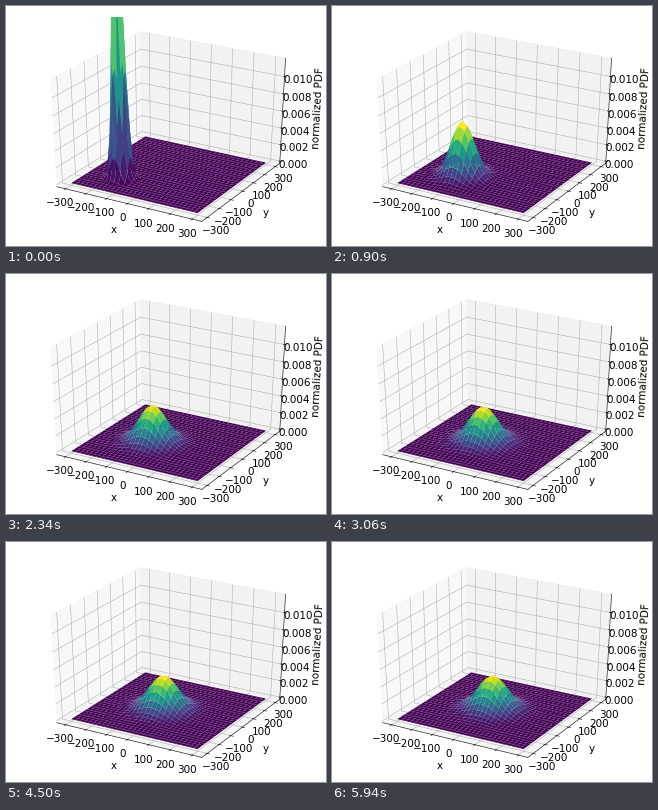
A matplotlib script that plays this animation: 320x240 px, repeating every 6.12 s.

```python
import numpy as np
import matplotlib.pyplot as plt
from matplotlib.animation import FuncAnimation

FRAMES, INTERVAL = 34, 180
W, H, DPI = 320, 240, 50
FONT = 15
RATE = 0.08            # relaxation per frame
START = -150           # initial mean of x and y
VAR_END = 4045         # equilibrium variance
STEP = 10              # grid spacing
Z_TOP = 3 * STEP**2 / (2 * np.pi * VAR_END)

grid = np.arange(-300, 301, STEP)
X, Y = np.meshgrid(grid, grid)


def density(n):
    """Gaussian relaxing in a harmonic trap, summing to one on the grid."""
    mean = START * np.exp(-RATE * n)
    var = VAR_END * (1 - 0.87 * np.exp(-2 * RATE * n))
    p = np.exp(-((X - mean)**2 + (Y - mean)**2) / (2 * var))
    return p / p.sum()


def padded(low, high):
    pad = (high - low) / 48
    return low - pad, high + pad


plt.rcParams.update({"font.family": "DejaVu Sans", "font.size": FONT,
                     "xtick.labelsize": FONT, "ytick.labelsize": FONT,
                     "axes.labelsize": FONT})
fig = plt.figure(figsize=(W / DPI, H / DPI), dpi=DPI)
ax = fig.add_subplot(projection="3d")

# Fill the figure up to a fixed margin instead of keeping a square box.
margin = 1.08 * FONT * DPI / 72
ax.apply_aspect = lambda position=None: None
ax.set_position([margin / W, margin / H, 1 - 2 * margin / W, 1 - 2 * margin / H])
ax.set_box_aspect((1, 1, 1), zoom=np.sqrt(3) / 1.8294640721620434)
ax.view_init(elev=30, azim=-60)

ax.set_xlim(*padded(-330, 330))
ax.set_ylim(*padded(-330, 330))
ax.set_xticks(range(-300, 301, 100))
ax.set_yticks(range(-300, 301, 100))
ax.set_zticks(np.arange(6) * 0.002)
ax.set_zlim(*padded(0, Z_TOP))
ax.set_xlabel("x", labelpad=10)
ax.set_ylabel("y", labelpad=10)
ax.set_zlabel("normalized PDF", labelpad=10)

surface = None


def draw(n):
    global surface
    if surface is not None:
        surface.remove()
    surface = ax.plot_surface(X, Y, density(n), cmap="viridis")
    return [surface]


anim = FuncAnimation(fig, draw, frames=FRAMES, interval=INTERVAL, repeat=True)
plt.show()
```
